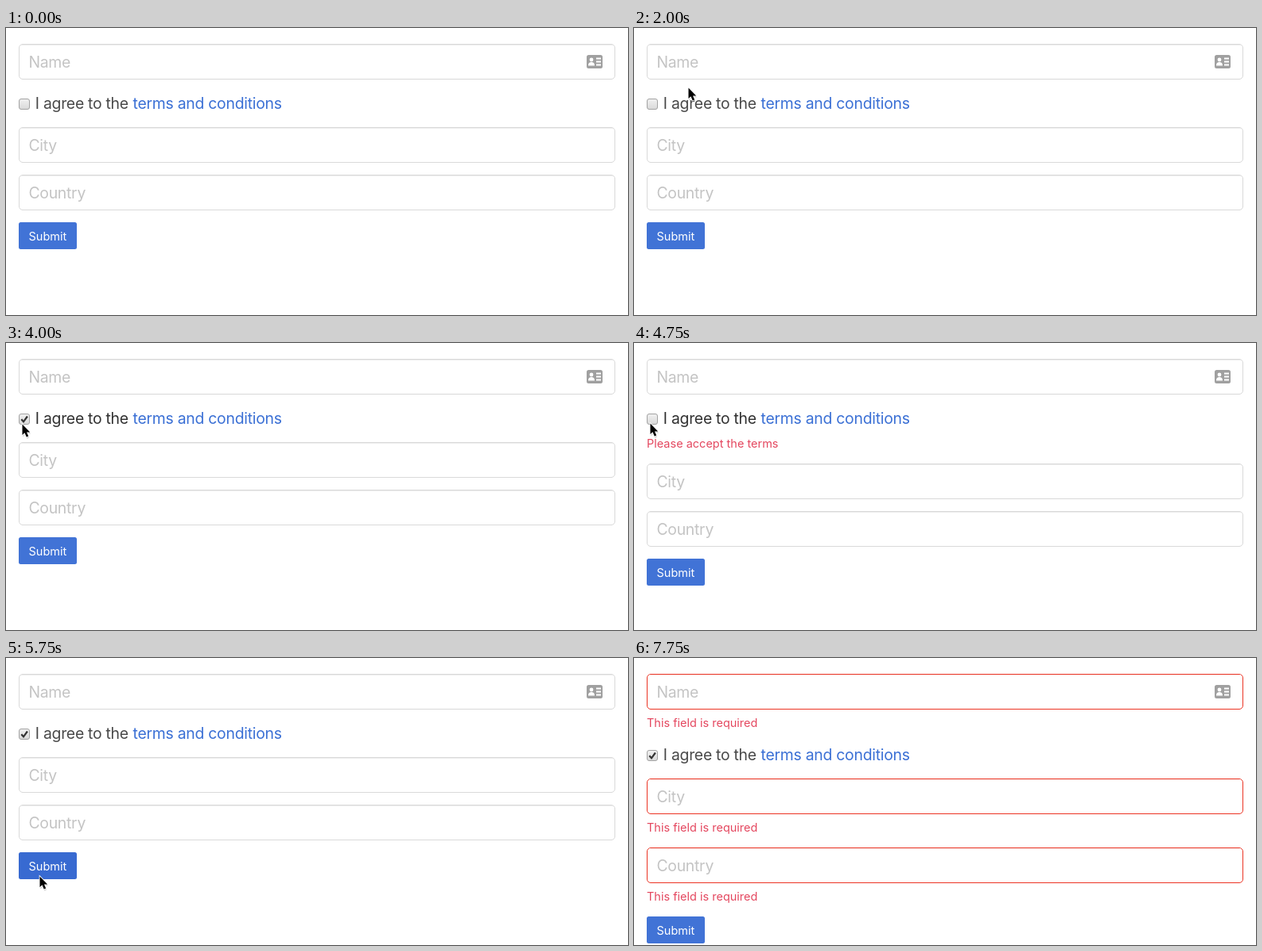
These frames come from a looping animation (782x362 px, 8500 ms). An HTML page:

```html
<!DOCTYPE html>
<html lang="en">
<head>
<meta charset="utf-8">
<title>Form validation</title>
<style>
  html, body { margin: 0; width: 100%; height: 100%; overflow: hidden; background: #fff; }
  svg { display: block; font-family: Inter, Roboto, sans-serif; }
  .large { font-size: 19.4px; letter-spacing: -.27px; }
  .small { font-size: 14.5px; }
  .hint { fill: #c4c4c4; }
  .error { fill: #e4475f; }
  .box { fill: #fff; stroke: #d9d9d9; }
  .invalid .box { stroke: #ec3323; }
  .shade { stroke: #ededed; }
  .invalid .shade { stroke: #f7f3f3; }
</style>
</head>
<body>
<svg id="stage" width="782" height="362" viewBox="0 0 782 362">
  <defs>
    <linearGradient id="plastic" x2="0" y2="1">
      <stop stop-color="#f1f1f1"/><stop offset="1" stop-color="#d9d9d9"/>
    </linearGradient>
  </defs>
  <g id="fields"></g>
  <g id="icon" transform="translate(730 34)">
    <rect width="20" height="17" rx="2.5" fill="#a0a0a0"/>
    <g fill="#fff">
      <circle cx="6" cy="6" r="2.4"/>
      <path d="M2 13.5c0-3.2 1.6-4.4 4-4.4s4 1.2 4 4.4z"/>
      <path d="M12 3.5h6v2h-6zM12 7.5h6v2h-6zM12 11.5h6v2h-6z"/>
    </g>
  </g>
  <g id="terms">
    <rect x="16.5" y="89.5" width="13" height="13" rx="2.5" fill="url(#plastic)" stroke="#a3a3a3"/>
    <path id="tick" d="M19.3 96.3l2.7 3 4.9-6.8" fill="none" stroke="#333" stroke-width="2.2"/>
    <text id="label" class="large" x="36.8" y="102">I agree to the</text>
    <text id="link" class="large" x="159.6" y="102">terms and conditions</text>
    <text id="termsError" class="small error" x="16" y="132">Please accept the terms</text>
  </g>
  <g id="button">
    <rect id="ring" x="14.5" y="-1.5" width="76" height="37" rx="3.5" fill="#cbdcf7"/>
    <rect id="face" x="16" width="73" height="34" rx="2.5"/>
    <text class="small" x="28.5" y="23" fill="#fff">Submit</text>
  </g>
  <g id="cursor">
    <path d="M.5 1v14l3.1-2.9 2.2 5.2 2.7-1.1-2.2-5h4.5z" fill="#000" opacity=".16" transform="translate(.6 1.4)"/>
    <path d="M.5 .5v13.6l3-2.8 2.2 5.1 2.5-1-2.2-5h4.2z" fill="#000" stroke="#fff" stroke-width="1.6" paint-order="stroke"/>
  </g>
</svg>
<script>
  const LOOP = 8500, STEP = 250, ERROR_HEIGHT = 27;
  const $ = id => document.getElementById(id);
  const show = (node, on) => node.setAttribute('visibility', on ? 'visible' : 'hidden');
  const moveTo = (node, x, y) => node.setAttribute('transform', `translate(${x} ${y})`);
  const within = (t, from, to) => t >= from && t < to;

  // Pointer stops: time, x, y
  const stops = [
    [500, 330, 335], [750, 240, 205], [1000, 120, 92], [1250, 62, 160], [1500, 42, 284],
    [1750, 50, 185], [2000, 68, 75], [2250, 164, 94], [2500, 62, 99], [2750, 24, 102],
    [3000, 23, 101], [3250, 21, 101], [4000, 20, 102], [4750, 20, 101],
    [5500, 32, 205], [5750, 42, 275], [6000, 42, 273],
    [6250, 54, 291], [6500, 56, 312], [6750, 58, 326]
  ];
  const pointerAt = t => stops.filter(stop => stop[0] <= t).pop();

  function makeField(name) {
    const group = document.createElementNS('http://www.w3.org/2000/svg', 'g');
    group.innerHTML = `
      <rect class="box" x="16.5" y=".5" width="749" height="44" rx="4.5"/>
      <path class="shade" d="M19 1.5H763"/>
      <text class="large hint" x="28.4" y="30">${name}</text>
      <text class="small error" x="16" y="67">This field is required</text>`;
    $('fields').append(group);
    return group;
  }
  const [nameField, cityField, countryField] = ['Name', 'City', 'Country'].map(makeField);

  function placeField(field, y, invalid) {
    moveTo(field, 0, y);
    field.classList.toggle('invalid', invalid);
    show(field.querySelector('.error'), invalid);
  }

  function render(time) {
    const t = Math.floor(time % LOOP / STEP) * STEP;
    const submitted = t >= 6000;
    const termsMissing = within(t, 4250, 5250);
    const required = submitted ? ERROR_HEIGHT : 0;
    const shift = required + (termsMissing ? ERROR_HEIGHT : 0);

    placeField(nameField, 20, submitted);
    moveTo($('terms'), 0, required);
    placeField(cityField, 125 + shift, submitted);
    placeField(countryField, 185 + shift + required, submitted);
    moveTo($('button'), 0, 245 + shift + 2 * required);

    show($('tick'), t >= 3500 && !termsMissing);
    show($('termsError'), termsMissing);
    const overLabel = t === 1000 || within(t, 2250, 5500);
    $('label').setAttribute('fill', overLabel ? '#303030' : '#484848');
    $('link').setAttribute('fill', t === 2250 ? '#363636' : '#3b70d5');
    $('face').setAttribute('fill', t === 5750 ? '#386ad1' : '#4173d6');
    show($('ring'), within(t, 6000, 7750));

    const pointer = pointerAt(t);
    show($('cursor'), pointer && t < 7500);
    if (pointer) moveTo($('cursor'), pointer[1], pointer[2]);
  }

  const start = performance.now();
  function tick() {
    render(performance.now() - start);
    requestAnimationFrame(tick);
  }
  tick();
</script>
</body>
</html>
```
